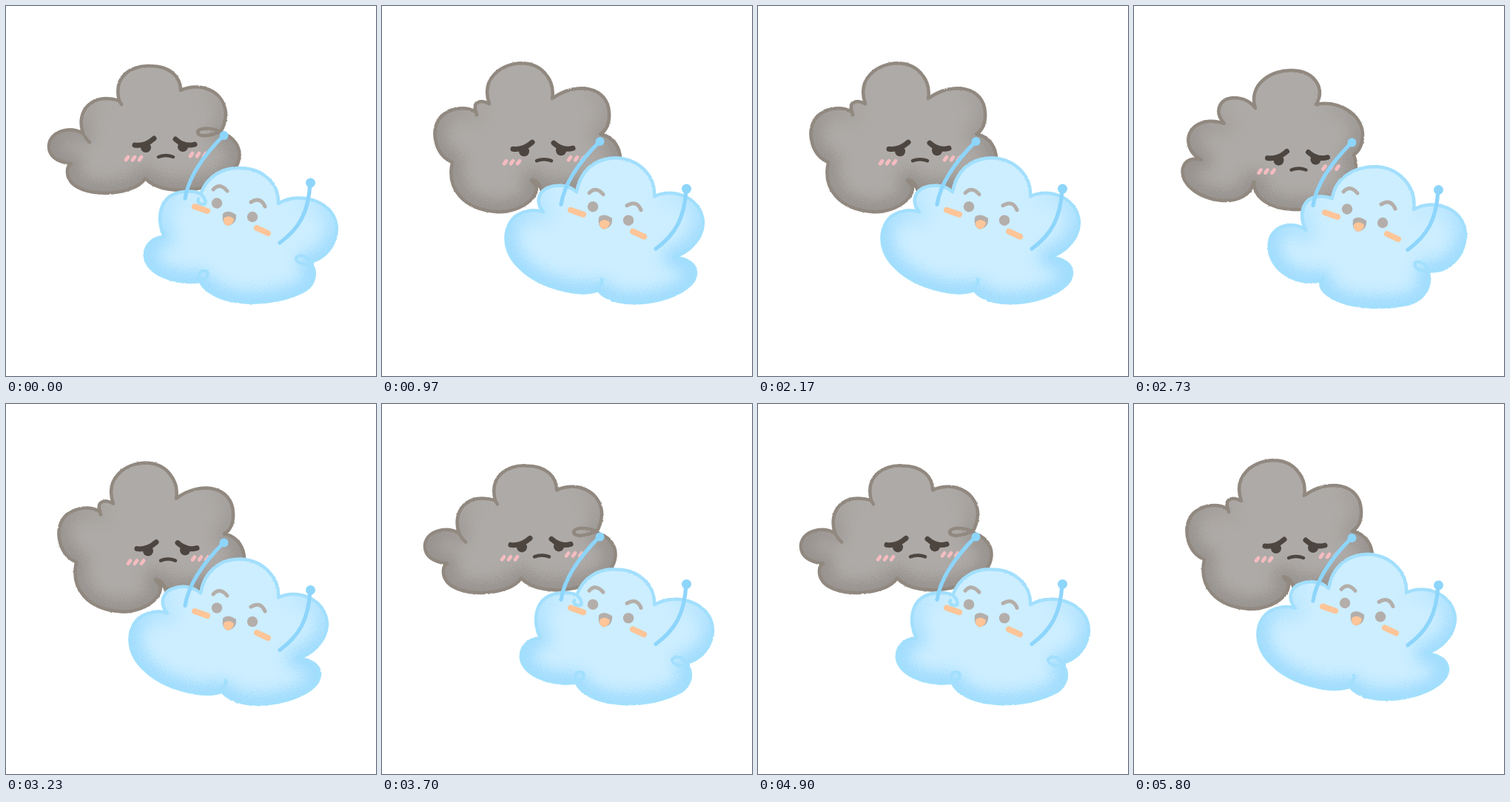
An HTML page for the animation above (5860 ms loop, 500x500 px).

```html
<!DOCTYPE html>
<html lang="en">
<head>
<meta charset="utf-8">
<title>Clouds</title>
<style>
html, body { margin: 0; width: 100%; height: 100%; overflow: hidden; background: #fff; }
svg { display: block; width: 100vw; height: 100vh; }
path { fill: none; stroke-linecap: round; stroke-linejoin: round; }
</style>
</head>
<body>
<svg id="stage" viewBox="0 0 500 500">
  <defs>
    <filter id="rough" filterUnits="userSpaceOnUse" x="0" y="0" width="500" height="500" color-interpolation-filters="sRGB">
      <feTurbulence type="fractalNoise" baseFrequency=".3" numOctaves="2" seed="4"/>
      <feDisplacementMap in="SourceGraphic" scale="2" xChannelSelector="R" yChannelSelector="G"/>
    </filter>
    <filter id="grain" filterUnits="userSpaceOnUse" x="0" y="0" width="500" height="500" color-interpolation-filters="sRGB">
      <feGaussianBlur in="SourceGraphic" stdDeviation="9" result="soft"/>
      <feTurbulence type="fractalNoise" baseFrequency=".8" numOctaves="2" seed="9"/>
      <feDisplacementMap in="soft" scale="30" xChannelSelector="R" yChannelSelector="G"/>
    </filter>
  </defs>
</svg>
<script>
const GRAY = { fill: '#aeaaa7', line: '#918980', shade: '#8f8a86', depth: 0.75 };
const BLUE = { fill: '#cceeff', line: '#a2dffd', shade: '#98d8fd', depth: 0.85 };

// Each pose is drawn where it stands at its anchor step of the bounce.
const POSES = [
  {
    anchor: 0, grayFace: [0, 0], blueFace: [0, 0], brows: [0, -1], arms: 0,
    gray: 'M88 213C68 211 57 202 58 188C60 169 86 162 104 172C94 142 116 116 153 128C144 93 172 80 195 81C222 81 236 96 236 114C262 102 294 114 297 144C297 157 293 166 289 172C306 174 318 190 315 206C309 247 217 264 188 233C172 260 80 262 83 222C83 218 85 215 88 213Z',
    grayCurls: 'M104 172Q108 180 113 184M153 128L156 133M296 176C290 165 262 162 259 170C259 178 277 176 287 170',
    blue: 'M214 312C204 293 203 255 240 251C250 250 258 251 263 254C272 229 294 218 316 219C347 219 369 240 368 267C397 249 447 264 447 302C446 324 430 342 410 346C422 358 417 376 404 384C364 407 282 409 262 372C238 376 198 367 189 344C184 325 198 312 214 312Z',
    blueCurls: 'M262 372C257 358 269 355 272 360C274 366 268 371 262 369M414 348C404 351 392 347 392 341C396 334 407 338 412 346M263 254C270 260 272 268 266 268C261 268 258 264 260 261'
  },
  {
    anchor: 5, grayFace: [6.5, 17.5], blueFace: [3, 8], brows: [3, 2], arms: -1.5,
    gray: 'M164 138C154 107 184 86 214 87C246 88 259 114 246 133C278 127 308 147 309 173C309 189 303 197 297 201C301 211 300 219 299 227C291 270 263 276 215 275C183 274 162 259 162 238C158 256 140 264 120 263C86 260 62 240 66 219C69 208 80 204 91 208C71 197 68 175 82 163C93 154 110 154 122 159C107 142 116 125 134 124C149 124 158 130 164 138Z',
    grayCurls: '',
    blue: 'M268 260C271 234 296 217 326 217C358 218 382 244 378 275C405 259 447 273 448 309C446 345 417 363 397 357C404 381 390 396 373 402C341 409 302 409 276 398C258 390 250 381 253 371C224 378 193 363 184 336C178 309 193 297 211 296C221 296 228 299 232 303C223 284 226 262 246 258C255 256 262 258 268 260Z',
    blueCurls: 'M397 357C388 361 377 352 380 347C386 343 397 350 399 360M253 371L256 366'
  },
  {
    anchor: 15, grayFace: [3, 4], blueFace: [0, 2.5], brows: [0, 1.5], arms: 1.5,
    gray: 'M95 210C73 201 66 172 76 153C87 136 112 133 127 142C122 129 132 124 145 131C133 97 161 76 190 76C218 77 234 101 230 124C262 100 306 107 307 144C308 158 302 168 295 172C314 175 322 192 322 206C318 235 262 255 216 246C212 241 205 236 203 233C222 250 192 278 156 277C110 274 87 246 95 210Z',
    grayCurls: 'M127 142L128 146M216 249Q212 234 202 234L208 242L205 236',
    blue: 'M218 276C206 262 212 246 228 242C240 238 254 241 263 249C268 220 288 203 317 203C350 205 370 230 368 255C395 242 433 258 434 291C433 314 413 332 394 337C421 340 429 354 421 369C400 399 316 412 292 382C264 392 212 376 189 354C161 330 162 295 182 281C193 274 207 272 218 276Z',
    blueCurls: 'M292 382C292 376 299 373 297 367'
  }
];

const line = (d, color, width) => `<path d="${d}" stroke="${color}" stroke-width="${width}"/>`;
const dot = (x, y, r, color) => `<circle cx="${x}" cy="${y}" r="${r}" fill="${color}"/>`;

// The shade fades out towards the top centre of the cloud.
function cloud(id, outline, curls, { fill, line: edge, shade, depth }) {
  return `<clipPath id="${id}"><path d="${outline}"/></clipPath>
    <radialGradient id="${id}-shade" cx=".52" cy=".15" r=".85">
      <stop offset=".3" stop-color="${shade}" stop-opacity="0"/>
      <stop offset=".75" stop-color="${shade}"/>
    </radialGradient>
    <path d="${outline}" style="fill:${fill}"/>
    <g clip-path="url(#${id})"><g filter="url(#grain)" opacity="${depth}">${line(outline, `url(#${id}-shade)`, 30)}</g></g>
    <g filter="url(#rough)">${line(outline + curls, edge, 4.5)}</g>`;
}

function grayFace() {
  const ink = '#4c4540';
  const slashes = (x, y) => [0, 9, 18].map(dx => line(`M${x + dx} ${y}l3 -4`, '#f4bcc0', 4.8)).join('');
  return line('M174 188Q188 190 200 179', ink, 7) + line('M229 180Q241 191 255 187', ink, 7)
    + dot(189, 191, 7, ink) + dot(239, 190, 7, ink)
    + line('M206 204Q216 200 226 204', ink, 4.5) + slashes(162, 208) + slashes(249, 203);
}

function blueFace() {
  const ink = '#b4aeaa', peach = '#fdc598';
  return dot(285, 266.5, 7.2, ink) + dot(333, 285, 7.2, ink)
    + `<path d="M293 281Q299 274 311 282Q312 295 299 297Q291 293 293 281Z" style="fill:${ink}"/>`
    + `<path d="M294 287Q301 281 308 288Q307 296 299 297Q293 294 294 287Z" style="fill:${peach}"/>`
    + line('M255 271L272 277', peach, 8) + line('M339 300L354 307', peach, 8);
}

function brows() {
  const ink = '#b4aeaa';
  return line('M280 249Q289 239 299 251', ink, 5) + line('M331 266Q344 258 350 272', ink, 5);
}

function arms() {
  const sky = '#8dd5fb';
  return line('M242 260C247 228 270 199 294 175', sky, 5.2) + dot(294.5, 175, 6, sky)
    + line('M370 320C396 301 409 279 411 239', sky, 5.2) + dot(411.5, 239, 6.5, sky);
}

const shifted = ([x, y], body) => `<g transform="translate(${x} ${y})">${body}</g>`;
const stage = document.getElementById('stage');

stage.insertAdjacentHTML('beforeend', POSES.map((p, i) => `<g class="pose">
  <g class="gray">${cloud('gray' + i, p.gray, p.grayCurls, GRAY)}${shifted(p.grayFace, grayFace())}</g>
  <g class="blue">${cloud('blue' + i, p.blue, p.blueCurls, BLUE)}${shifted(p.blueFace, blueFace())}${shifted(p.brows, brows())}</g>
</g>`).join('') + `<g id="arms">${arms()}</g>`);

const poseGroups = [...stage.querySelectorAll('.pose')];
const armGroup = document.getElementById('arms');

const LOOP = 5860, CYCLE = 17, LAST_STEP = 83, TICK = 100 / 3;
const GRAY_SPEED = 1.2, BLUE_SPEED = 2.2;

// Steps last 70 ms, rounded to thirtieths of a second.
function stepAt(ms) {
  const tick = Math.floor((ms + 4) / TICK);
  let step = Math.min(LAST_STEP, Math.ceil(tick / 2.1) + 1);
  while (step > 0 && Math.round(step * 2.1) > tick) step--;
  return step;
}

const drop = phase => Math.min(phase, CYCLE - phase);
const poseAt = phase => phase < 5 || phase > 15 ? 0 : phase < 9 ? 1 : 2;
const moveY = (node, y) => node.setAttribute('transform', `translate(0 ${y.toFixed(2)})`);

let shownStep = -1;
function render(ms) {
  const step = stepAt(ms % LOOP);
  if (step === shownStep) return;
  shownStep = step;
  const phase = step % CYCLE;
  const current = poseAt(phase);
  const pose = POSES[current];
  const delta = drop(phase) - drop(pose.anchor);
  poseGroups.forEach((group, i) => { group.style.display = i === current ? '' : 'none'; });
  moveY(poseGroups[current].querySelector('.gray'), delta * GRAY_SPEED);
  moveY(poseGroups[current].querySelector('.blue'), delta * BLUE_SPEED);
  moveY(armGroup, drop(phase) * BLUE_SPEED + pose.arms);
}

const start = performance.now();
function loop() {
  render(performance.now() - start);
  requestAnimationFrame(loop);
}
loop();
</script>
</body>
</html>
```
